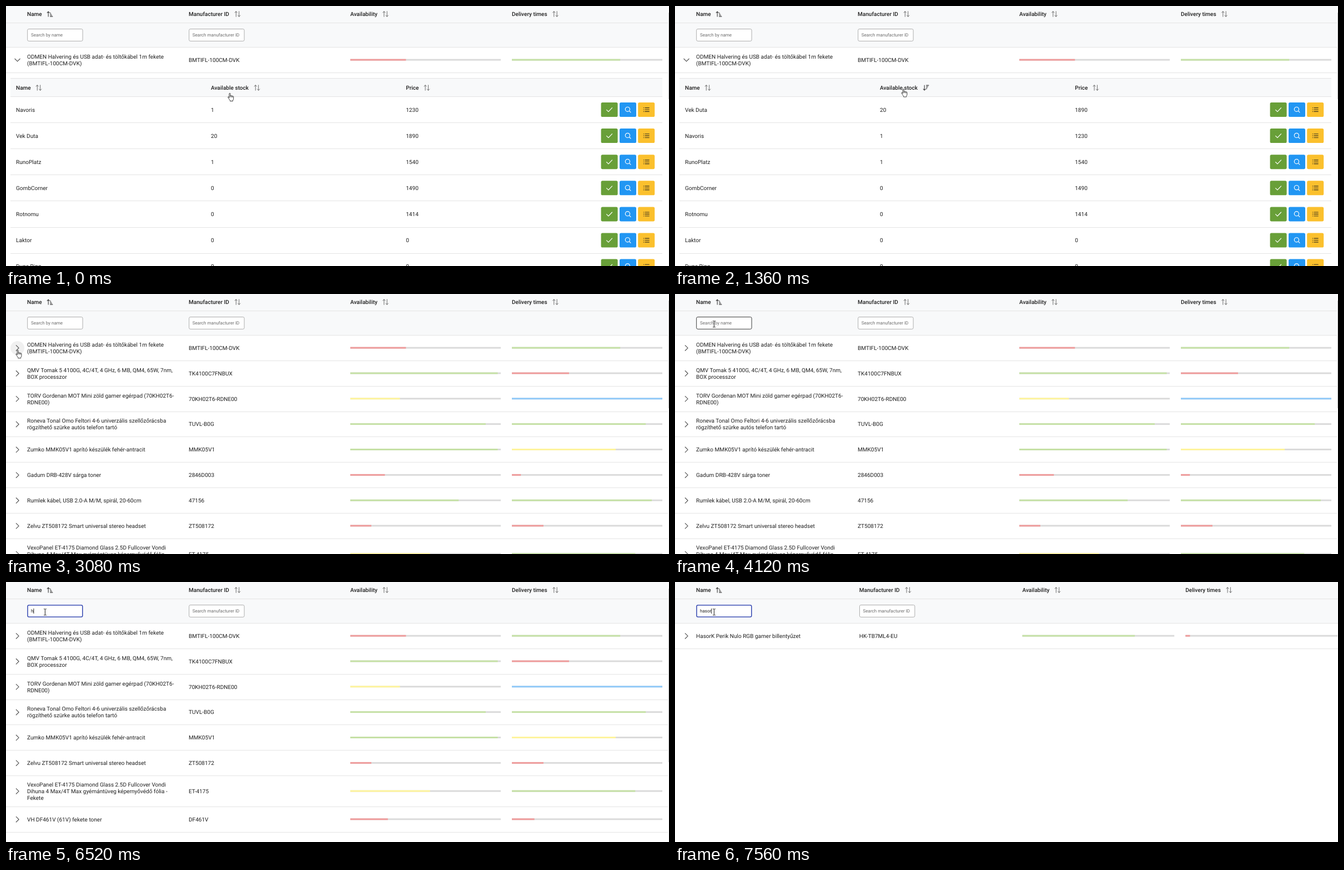
Animation of 1194 by 469 pixels, one loop 8000 ms. Source, as an HTML page:

```html
<!DOCTYPE html>
<html lang="en">
<head>
<meta charset="utf-8">
<title>Product table</title>
<style>
  html, body { margin: 0; width: 100%; height: 100%; overflow: hidden; background: #fff; }
  svg { display: block; width: 100vw; height: 100vh; }
  text { font: 400 10.05px Roboto, sans-serif; fill: #212121; text-rendering: geometricPrecision; }
  .head { font-weight: 500; }
  .field { font-size: 8.05px; }
  .hint { fill: #6c6c6c; }
  .line { fill: none; stroke-linecap: round; stroke-linejoin: round; }
</style>
</head>
<body>
<svg id="stage" viewBox="0 0 1194 469"></svg>
<script>
const LOOP = 8000;
const stage = document.getElementById('stage');
const INK = '#5f5f5f', EDGE = '#e4e4e4';
const TONES = { r: '#ef9a9a', g: '#c5e1a5', y: '#fff59d', b: '#90caf9' };

// name lines, code, availability, delivery
const products = [
  ['ODMEN Halvering és USB adat- és töltőkábel 1m fekete|(BMTIFL-100CM-DVK)', 'BMTIFL-100CM-DVK', 'r37', 'g72'],
  ['QMV Tomak 5 4100G, 4C/4T, 4 GHz, 6 MB, QM4, 65W, 7nm,|BOX processzor', 'TK4100C7FNBUX', 'g98', 'r38'],
  ['TORV Gordenan MOT Mini zöld gamer egérpad (70KH02T6-|RDNE00)', '70KH02T6-RDNE00', 'y33', 'b100'],
  ['Roneva Tonal Omo Feltori 4-6 univerzális szellőzőrácsba|rögzíthető szürke autós telefon tartó', 'TUVL-B0G', 'g90', 'g89'],
  ['Zumko MMK05V1 aprító készülék fehér-antracit', 'MMK05V1', 'g98', 'y69'],
  ['Gadum DRB-428V sárga toner', '2846D003', 'r23', 'r6'],
  ['Rumlek kábel, USB 2.0-A M/M, spirál, 20-60cm', '47156', 'g72', 'g93'],
  ['Zelvu ZT508172 Smart universal stereo headset', 'ZT508172', 'r14', 'r21'],
  ['VexoPanel ET-4175 Diamond Glass 2.5D Fullcover Vondi|Dihuna 4 Max/4T Max gyémántüveg képernyővédő fólia -|Fekete', 'ET-4175', 'y53', 'g82'],
  ['VH DF461V (61V) fekete toner', 'DF461V', 'r25', 'r15'],
  ['HasorK Perik Nulo RGB gamer billentyűzet', 'HK-TB7ML4-EU', 'g74', 'r3']
];

// supplier, stock, price
const offers = [
  ['Navoris', 1, 1230], ['Vek Duta', 20, 1890], ['RunoPlatz', 1, 1540], ['GombCorner', 0, 1490],
  ['Rotnomu', 0, 1414], ['Laktor', 0, 0], ['Dune Ring', 0, 0]
];

const pointer = [
  [0, 'hand', 398.8, 156.6], [680, 'hand', 414, 155.5], [1360, 'hand', 407, 149],
  [1720, 'hand', 359, 136], [2080, 'beam', 188, 85], [2400, 'beam', 43.8, 87.3],
  [2760, 'hand', 17, 100.8], [3440, 'arrow', 41, 73], [3760, 'beam', 70.4, 54.3]
];
const typing = [[0, ''], [6520, 'h'], [6880, 'has'], [7200, 'haso'], [7560, 'hasor']];
const sorting = [[0, 'none'], [320, 'up'], [1040, 'down']];
const focusing = [[0, 'idle'], [3760, 'enter'], [4120, 'hover'], [4480, 'focus']];
const blinking = [[0, 0], [4480, 1], [4800, 0], [5160, 1], [5840, 0], [6160, 1]];
const moments = [...new Set([pointer, typing, sorting, focusing, blinking, [[3080]]].flat().map(s => s[0]))];

const at = (steps, t) => steps.filter(s => s[0] <= t).pop();

const rect = (x, y, w, h, fill, r = 0) =>
  `<rect x="${x}" y="${y}" width="${w}" height="${h}" rx="${r}" fill="${fill}"/>`;
const path = (d, x, y, stroke, w) =>
  `<path class="line" d="${d}" transform="translate(${x} ${y})" stroke="${stroke}" stroke-width="${w}"/>`;
const text = (s, x, mid, cls = '', drop = 3.6) =>
  `<text x="${x}" y="${mid + drop}" class="${cls}">${s}</text>`;
const rule = (x, y, w) => rect(x, Math.floor(y), w, 1, EDGE);

const sortPaths = {
  none: 'M-2.7 4.8V-4.6M-4.9 -2.4L-2.7 -4.7L-.5 -2.4M2.7 -4.7V4.7M.5 2.5L2.7 4.8L4.9 2.5',
  up: 'M-2.8 4.6V-4.3M-4.8 -2.2L-2.8 -4.4L-.8 -2.2M.6 -1.8H1.3M.6 .3H2.4M.6 2.4H3.6M.6 4.5H4.9',
  down: 'M-2.8 -4.4V4.5M-4.8 2.4L-2.8 4.6L-.8 2.4M.6 -4.3H4.9M.6 -2.2H3.6M.6 -.1H2.4M.6 2H1.3'
};
const heading = (s, x, y, gap, order = 'none') =>
  text(s, x, y, 'head') +
  path(sortPaths[order], x + gap, y + .4, order === 'none' ? INK : '#3a3a3a', order === 'none' ? .9 : 1.1);

function meter(x, y, w, spec) {
  const part = w * spec.slice(1) / 100;
  return rect(x, y - 1.8, w, 2.9, '#dadada') + rect(x, y - 1.8, part, 2.9, TONES[spec[0]]);
}

function field(x, mode) {
  const stroke = { idle: '#adadad', enter: '#777', hover: '#3c3c3c', focus: '#3f51b5' }[mode];
  const w = mode === 'focus' ? 1.6 : 1;
  return `<rect x="${x + .2 + w / 2}" y="${41 + w / 2}" width="${100.4 - w}" height="${22.8 - w}" rx="2.4"
    fill="#fff" stroke="${stroke}" stroke-width="${w}"/>`;
}

function button(x, y, fill, icon, ink) {
  return rect(x, y - 13, 30, 26, fill, 2.6) + path(icon, x + 15, y, ink, 1.15);
}

function offerTable(order) {
  const sign = { none: 0, up: 1, down: -1 }[order];
  const rows = [...offers].sort((a, b) => sign * (a[1] - b[1]));
  let out = rect(8, 131, 1174, 32, '#f8f9fa') + rule(8, 130, 1174) + rule(8, 163, 1174) +
    heading('Name', 18, 147, 41) + heading('Available stock', 369, 147, 83, order) +
    heading('Price', 720.3, 147, 37.5);
  rows.forEach((row, i) => {
    const y = 187 + i * 47.1;
    row.forEach((cell, c) => out += text(cell, 18 + c * 351.1, y));
    out += button(1071.6, y, '#689f38', 'M-5 .3L-1.7 3.6L5 -3.4', '#fff') +
      button(1105, y, '#2196f3', 'M3.5 -.7A4.1 4.1 0 1 1 -4.7 -.7A4.1 4.1 0 1 1 3.5 -.7M2.4 2.2L5 4.9', '#fff') +
      button(1138.2, y, '#fbc02d', 'M-4.9 -3.4H-4.6M-4.9 0H-4.6M-4.9 3.4H-4.6M-2.3 -3.4H5M-2.3 0H5M-2.3 3.4H5', '#3a3320') +
      rule(8, y + 23.6, 1174);
  });
  return out;
}

function productRow(p, y, h, col, open, hover, width) {
  const mid = y + h / 2, lines = p[0].split('|');
  let out = hover ? `<circle cx="20.6" cy="${mid}" r="12.5" fill="#f0f0f0"/>` : '';
  out += path(open ? 'M-4.6 -2.2L0 2.4L4.6 -2.2' : 'M-2.3 -4.8L2.5 0L-2.3 4.8', 20.6, mid, '#555', 1.15);
  lines.forEach((s, i) => out += text(s, 38, mid - .2 + (i - (lines.length - 1) / 2) * 12));
  return out + text(p[1], 38 + col, mid - .2) +
    meter(38 + 2 * col, mid, col - 20, p[2]) + meter(38 + 3 * col, mid, col - 20, p[3]) +
    rule(0, y + h, width);
}

function cursor([, kind, x, y]) {
  const shape = {
    hand: ['M3.2 9.2V1.9Q3.2 .7 4.2 .7T5.2 1.9V5.6Q5.4 4.8 6.3 4.9T7.2 5.8Q7.5 5.1 8.3 5.3T9.1 6.3Q9.5 5.7 10.2 6T10.9 7V10.6Q10.8 12.6 9.7 13.4V15H4.7V13.6Q3.5 12.4 2.6 10.6L1 8.3Q.6 7.4 1.4 7.1T3.2 8.4M5.2 5.6V8M7.2 5.9V8.2M9.1 6.4V8.4', '#fff', '#111', .8],
    beam: ['M-2.4 -5.6H-.7L0 -5L.7 -5.6H2.4M0 -5V5M-2.4 5.6H-.7L0 5L.7 5.6H2.4', 'none', '#111', .95],
    arrow: ['M.5 .5V11.4L3 9.1L4.7 12.9L6.3 12.2L4.7 8.6H8.2Z', '#fff', '#111', .75]
  }[kind];
  return `<path d="${shape[0]}" transform="translate(${x} ${y})" fill="${shape[1]}" stroke="${shape[2]}"
    stroke-width="${shape[3]}" stroke-linejoin="round"/>`;
}

function draw(t) {
  const query = at(typing, t)[1], mode = at(focusing, t)[1];
  const open = t < 3080, wide = query.length > 1;
  const col = wide ? 293.75 : 291, width = wide ? 1194 : 1192;
  const rows = products.filter(p => p[0].toLowerCase().includes(query));

  let out = rect(0, 0, 1194, 469, '#fff') + rect(0, 0, width, 74, '#f8f9fa') +
    rule(0, 30, width) + rule(0, 74, width);
  [['Name', 41, 'up'], ['Manufacturer ID', 88], ['Availability', 63.5], ['Delivery times', 78.5]]
    .forEach(([s, gap, order], i) => out += heading(s, 38 + i * col, 14, gap, order));

  out += field(38, mode) + field(38 + col, 'idle') +
    text('Search manufacturer ID', 44.8 + col, 52.4, 'field hint', 2.8) +
    `<text id="query" x="45" y="55.2" class="field ${query ? '' : 'hint'}">${query || 'Search by name'}</text>` +
    '<rect id="caret" y="47.8" width=".9" height="9.2" fill="#111"/>';

  let y = 74.5;
  for (const p of open ? rows.slice(0, 1) : rows) {
    const h = p[0].split('|').length > 2 ? 55.7 : 45.85;
    out += productRow(p, y, h, col, open, y < 75 && t >= 2760 && t < 3440, width);
    y += h;
    if (y > 469) break;
  }
  if (open) out += offerTable(at(sorting, t)[1]);
  if (!wide) {
    const end = open ? 168 : query ? 325 : 206;
    out += rect(1193, 0, 1, 469, '#f1f1f1') + rect(1193, 12, 1, end - 12, '#c4c4c4');
  }
  stage.innerHTML = out + cursor(at(pointer, t));

  const caret = document.getElementById('caret');
  const typed = query ? document.getElementById('query').getComputedTextLength() : 0;
  caret.setAttribute('x', 45 + typed);
  caret.setAttribute('visibility', at(blinking, t)[1] ? 'visible' : 'hidden');
}

let shown = -1;
const start = performance.now();
function tick() {
  const t = (performance.now() - start) % LOOP;
  const step = Math.max(...moments.filter(m => m <= t));
  if (step !== shown) draw(shown = step);
  requestAnimationFrame(tick);
}
tick();
</script>
</body>
</html>
```
